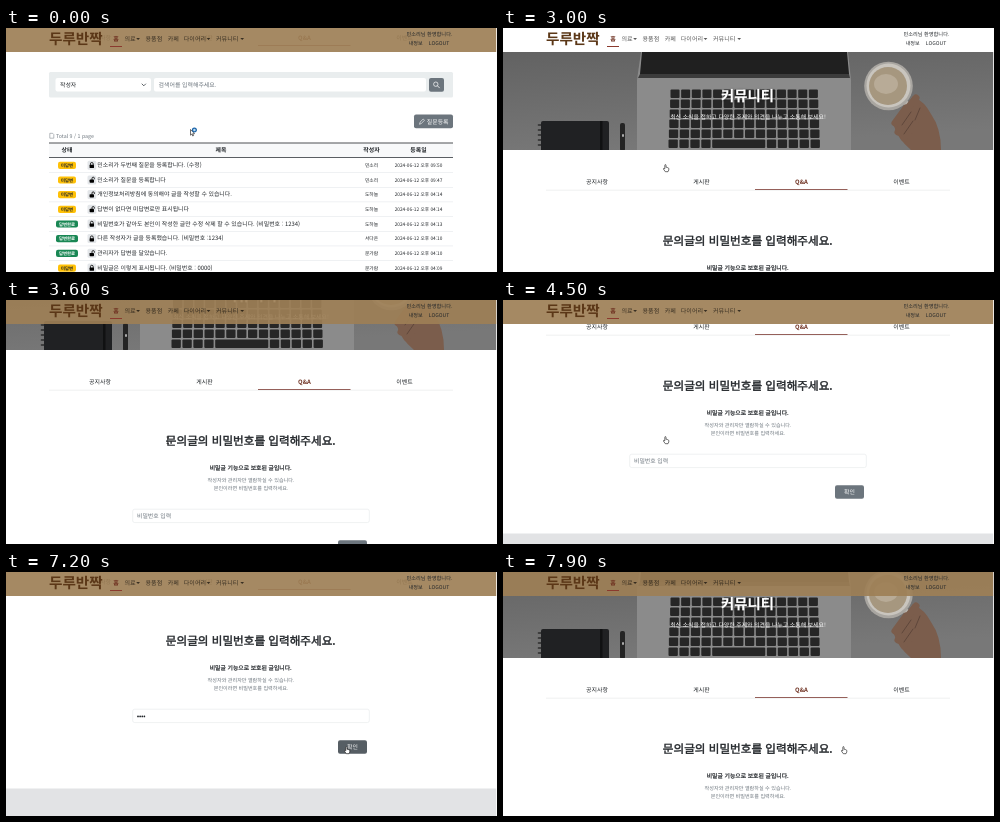
Write an HTML page that moves like this. It is 491 by 244 pixels and loops after 8 s.

```html
<!DOCTYPE html>
<html lang="ko">
<head>
<meta charset="utf-8">
<title>Q&amp;A</title>
<style>
html, body { margin: 0; width: 100%; height: 100%; overflow: hidden; background: #fff; }
svg { display: block; width: 491px; height: 244px; }
text { font-family: "Noto Sans CJK KR", "Noto Sans KR", "Noto Sans CJK", sans-serif; text-rendering: geometricPrecision; white-space: pre; }
/* medium weight: regular with a hairline outline */
text[font-weight="500"] { stroke: #212529; stroke-width: .035em; }

/* One shared 8 s clock; 1% = 80 ms. */
.a { animation: 8s linear infinite; }
.step { animation-timing-function: step-end; }
#list { animation-name: list; }
#page { animation-name: page; }
#scroll { animation-name: scroll; }
#bar { animation-name: bar; }
#hover { animation-name: hover; }
#cursor { animation-name: move; animation-timing-function: ease-in-out; }
#hand { animation-name: hand; }
#arrow { animation-name: arrow; }
#busy { animation-name: busy; }
#beam { animation-name: beam; }
#ring { animation-name: ring; }
#hint { animation-name: hint; }
#cover { animation-name: typing; }
#ok { animation-name: ok; }

@keyframes list { 0% { opacity: 1 } 25%, 100% { opacity: 0 } }
@keyframes page { 0% { opacity: 0 } 25%, 100% { opacity: 1 } }
@keyframes scroll {
  0%, 38.75% { transform: translateY(0) }
  45%, 46.25% { transform: translateY(-72px) }
  50%, 59% { transform: translateY(-127px) }
  63%, 93.74% { transform: translateY(-144px) }
  93.75%, 96.25% { transform: translateY(0) }
  98.75%, 100% { transform: translateY(-36px) }
}
@keyframes bar {
  0%, 39%, 96.3% { fill: rgba(158,127,86,.92) }
  25%, 93.75% { fill: #fff }
  100% { fill: rgba(158,127,86,.92) }
}
@keyframes hover { 0% { opacity: 0 } 12.5%, 100% { opacity: 1 } }
@keyframes move {
  0%, 6.25% { transform: translate(186px,104px) }
  15%, 19% { transform: translate(165px,137px) }
  22.5%, 58.75% { transform: translate(163px,140px) }
  65%, 80% { transform: translate(200px,145px) }
  87.5%, 100% { transform: translate(341px,178px) }
}
@keyframes hand {
  0%, 43.75%, 63.75% { opacity: 0 }
  12.5%, 47.5%, 86.25%, 100% { opacity: 1 }
}
@keyframes arrow { 0%, 81.25% { opacity: 1 } 12.5%, 86.25%, 100% { opacity: 0 } }
@keyframes busy { 0% { opacity: 1 } 8.75%, 100% { opacity: 0 } }
@keyframes beam {
  0%, 47.5%, 81.25%, 100% { opacity: 0 }
  43.75%, 63.75% { opacity: 1 }
}
@keyframes ring { 0%, 88.75%, 100% { opacity: 0 } 66.25% { opacity: 1 } }
@keyframes hint { 0%, 93.75%, 100% { opacity: 1 } 70% { opacity: 0 } }
@keyframes typing {
  0%, 93.75%, 100% { transform: translateX(0) }
  70% { transform: translateX(2.2px) }
  72.5% { transform: translateX(4.4px) }
  75% { transform: translateX(6.6px) }
  77.5% { transform: translateX(9px) }
}
@keyframes ok {
  0%, 86%, 93.75%, 100% { fill: #6c757d }
  88%, 93.74% { fill: #565e64 }
}
</style>
</head>
<body>
<svg id="stage" viewBox="0 0 491 244"></svg>
<script>
const INK = '#212529', GREY = '#6c757d', BROWN = '#6d2f1f', WIDE = 490.2;

// y is the middle of the line of text
const text = (x, y, size, str, fill = INK, weight = 400, anchor = 'start') =>
  `<text x="${x}" y="${(y + size * 0.37).toFixed(2)}" font-size="${size}" fill="${fill}" font-weight="${weight}" text-anchor="${anchor}">${str}</text>`;
const mid = (x, y, size, str, fill, weight) => text(x, y, size, str, fill, weight, 'middle');
const rect = (x, y, w, h, fill, r = 0, more = '') =>
  `<rect x="${x}" y="${y}" width="${w}" height="${h}" fill="${fill}" rx="${r}" ${more}/>`;
const path = (d, fill, more = '') => `<path d="${d}" fill="${fill}" ${more}/>`;
const line = (d, color, width, more = '') =>
  path(d, 'none', `stroke="${color}" stroke-width="${width}" stroke-linecap="round" stroke-linejoin="round" ${more}`);

function tabs() {
  const names = ['공지사항', '게시판', 'Q&amp;A', '이벤트'], xs = [94, 198.5, 298.5, 398.5];
  return rect(43, 161.8, 404, .6, '#e3e5e7') + rect(252, 161, 92.5, 1, '#95605a') +
    names.map((n, i) => mid(xs[i], 154, 5.95, n, i === 2 ? BROWN : INK, i === 2 ? 700 : 400)).join('');
}

function keyboard() {
  let keys = '';
  for (let r = 0; r < 6; r++) {
    const y = 61.5 + r * 10, left = 167.5 - r * .4, pitch = (149 + r * .8) / 14;
    for (let k = 0; k < 14; k++) {
      const space = r === 5 && k === 4;
      keys += rect(left + k * pitch, y, (space ? 5 : 1) * pitch - 1.6, 8.4, '#262626', 1);
      if (space) k += 4;
    }
  }
  return keys;
}

function mug() {
  const skin = '#7b5d4c', crease = '#5c4539';
  return line('M402 74L408 80', '#b9b5af', 5) +
    `<circle cx="385.5" cy="58" r="24.3" fill="#a9a6a1"/><circle cx="385.5" cy="57.5" r="22" fill="#c9c5be"/>
     <circle cx="385" cy="58" r="19" fill="#a6977f"/><ellipse cx="383" cy="56" rx="12" ry="10" fill="#b8ab97"/>` +
    path('M410 68Q422 74 428 86Q438 100 438 122H408Q394 110 391 98Z', skin) +
    line('M413 70L400 86M403 80L392 95M404 88L395 104M412 96L401 110', skin, 7) +
    line('M408 84L399 97M410 93L401 106M417 80L412 92', crease, .9);
}

function notebook() {
  let rings = '';
  for (let y = 97; y < 122; y += 5) rings += line(`M35.5 ${y}H40`, '#2c2c2c', 1.6);
  return rings + rect(38, 93, 68, 32, '#202123', 2) + rect(97, 93, 2.5, 29, '#101112') +
    rect(117, 95, 5, 28, '#242424', 2) + rect(119, 106, 2, 3, '#aaa', 1);
}

function banner() {
  return `<g clip-path="url(#bannerBox)">` +
    rect(0, 24, WIDE, 98, 'url(#desk)') +
    path('M138 24H345L348 52V122H134V52Z', '#8b8b8b') +
    path('M139 24H344L346 46H137Z', '#202020') +
    path('M137 46H346L347 50H135Z', '#3c3c3c') +
    keyboard() + notebook() + mug() + '</g>' +
    `<g filter="url(#soft)">${mid(244.5, 68, 14.4, '커뮤니티', '#fff', 700)}</g>` +
    mid(245, 89, 5.88, '최신 소식을 접하고 다양한 주제와 의견을 나누고 소통해 보세요!', '#fff');
}

function lock(y, open) {
  const shackle = open ? 'M86 0V-1.5A1.2 1.2 0 0 1 88.4 -1.5V-1' : 'M84.4 0V-1.3A1.4 1.4 0 0 1 87.2 -1.3V0';
  return `<g transform="translate(0 ${y})">` + rect(81.5, -4.5, 8.8, 9, '#e3e6e9', 1.5) +
    line(shackle, '#000', .8) + rect(83.6, -.4, 4.4, 3.3, '#000', .7) + '</g>';
}

// status (1 = answered), locked, title, author, time
const rows = [
  [0, 1, '민소리가 두번째 질문을 등록합니다. (수정)', '민소리', '09:50'],
  [0, 0, '민소리가 질문을 등록합니다', '민소리', '09:47'],
  [0, 0, '개인정보처리방침에 동의해야 글을 작성할 수 있습니다.', '도하늘', '04:14'],
  [0, 0, '답변이 없다면 미답변로만 표시됩니다', '도하늘', '04:14'],
  [1, 1, '비밀번호가 같아도 본인이 작성한 글만 수정 삭제 할 수 있습니다. (비밀번호 : 1234)', '도하늘', '04:13'],
  [1, 1, '다른 작성자가 글을 등록했습니다. (비밀번호 :1234)', '서다온', '04:10'],
  [1, 0, '관리자가 답변을 달았습니다.', '문가람', '04:10'],
  [0, 1, '비밀글은 이렇게 표시됩니다. (비밀번호 : 0000)', '문가람', '04:09'],
];

function row([done, locked, title, author, time], i) {
  const y = 137.2 + i * 14.68, w = done ? 22 : 18;
  return rect(61 - w / 2, y - 3.5, w, 7.2, done ? '#198754' : '#ffc107', 2) +
    mid(61, y, 4.4, done ? '답변완료' : '미답변', done ? '#fff' : INK, 700) +
    lock(y, !locked) + text(91.3, y - .4, 5.9, title) +
    mid(365.5, y, 4.8, author) + mid(412.5, y, 4.75, '2024-06-12 오후 ' + time) +
    rect(43, y + 7.1, 404, .5, '#dee2e6');
}

function list() {
  const head = [[61, '상태'], [215, '제목'], [365.5, '작성자'], [412.5, '등록일']];
  return rect(0, 0, 491, 244, '#fff') + `<g transform="translate(0 -144)">${tabs()}</g>` +
    rect(43, 44, 404, 25.5, '#e9edee', 1.5) +
    rect(49.5, 50, 95.5, 13.5, '#fff', 2) + text(54, 57, 5.9, '작성자') +
    line('M136 56L137.8 57.8L139.6 56', '#343a40', .8) +
    rect(148, 50, 272, 13.5, '#fff', 2) + text(152.5, 57, 5.95, '검색어를 입력해주세요.', GREY) +
    rect(423, 50, 15, 13.8, GREY, 2) +
    `<circle cx="429.8" cy="56.2" r="2.2" fill="none" stroke="#fff" stroke-width=".7"/>` + line('M431.5 57.9L433.4 59.8', '#fff', .8) +
    rect(408, 86.5, 39, 13.7, GREY, 2) + text(420.8, 93.4, 5.9, '질문등록', '#fff') +
    line('M413.6 95.9L414.2 94L417.2 91L418.5 92.3L415.5 95.3Z', '#fff', .6) +
    line('M44.2 105.3H46.7L47.8 106.5V110.2H44.2Z', GREY, .5) + text(50, 107.7, 5.25, 'Total 9 / 1 page', GREY) +
    rect(43, 115, 404, 14, '#f8f9fa') + rect(43, 114.6, 404, .8, INK) +
    head.map(([x, s]) => mid(x, 122, 5.9, s, INK, 700)).join('') +
    `<g id="hover" class="a step">${rect(43, 129.6, 404, 14.7, '#ececec')}</g>` +
    rect(43, 129, 404, .8, '#33383c') + rows.map(row).join('');
}

function form() {
  let dots = '';
  for (let i = 0; i < 4; i++) dots += `<circle cx="${132 + i * 2.15}" cy="288.4" r=".9" fill="${INK}"/>`;
  return rect(0, 24, 491, 620, '#fff') + banner() + tabs() +
    mid(244.7, 213, 11.6, '문의글의 비밀번호를 입력해주세요.', INK, 500) +
    mid(244.7, 240, 5.86, '비밀글 기능으로 보호된 글입니다.', INK, 500) +
    mid(245, 252, 5.1, '작성자와 관리자만 열람하실 수 있습니다.', GREY) +
    mid(245, 260, 5.1, '본인이라면 비밀번호를 입력하세요.', GREY) +
    rect(126.7, 281.2, 236.6, 13.4, '#fff', 2, 'stroke="#e4e7ea" stroke-width=".6"') + dots +
    rect(130.5, 284, 30, 8, '#fff', 0, 'id="cover" class="a step"') +
    `<g id="hint" class="a step">${text(131, 288, 5.9, '비밀번호 입력', GREY)}</g>` +
    `<g id="ring" class="a step">${rect(125.7, 280.2, 238.6, 15.4, 'none', 3, 'stroke="#0d6efd" stroke-opacity=".25" stroke-width="2"')}
     ${rect(126.7, 281.2, 236.6, 13.4, 'none', 2, 'stroke="#86b7fe" stroke-width=".6"')}</g>` +
    rect(332, 312.2, 29, 13.6, GREY, 2, 'id="ok" class="a"') + mid(346.4, 319, 5.9, '확인', '#fff') +
    rect(0, 360.5, WIDE, 280, '#e2e3e5');
}

function header() {
  const ink = 'rgba(0,0,0,.65)';
  const items = [[118.5, '의료', 130.2], [139.5, '용품점'], [161.8, '카페'], [177.8, '다이어리', 200.6], [210, '커뮤니티', 234.3]];
  return rect(0, 0, WIDE, 24, '#fff', 0, 'id="bar" class="a step"') +
    text(43, 11, 14.6, '두루반짝', '#5b3717', 700) +
    text(107.2, 11, 6, '홈', BROWN, 700) + rect(104, 18, 12, 1, '#8b3a2e') +
    items.map(([x, s, caret]) => text(x, 11, 6.05, s, ink) +
      (caret ? path(`M${caret} 10H${caret + 3.8}L${caret + 1.9} 12Z`, ink) : '')).join('') +
    text(400.5, 6, 5.2, '민소리님 환영합니다.') + text(402.7, 15, 5.1, '내정보') + text(422.8, 15, 5.1, 'LOGOUT');
}

function cursor() {
  const edge = 'stroke="#111" stroke-width=".6" stroke-linejoin="round"';
  return `<g id="cursor" class="a">
    <g id="arrow" class="a step">${path('M-1.5 -2.5V3.2L-.2 2L.7 4L1.6 3.6L.7 1.7H2.5Z', '#fff', edge)}</g>
    <g id="busy" class="a step"><circle cx="2.4" cy="-2" r="1.9" fill="#b9dcf5" stroke="#1c64a8" stroke-width="1.3"/></g>
    <g id="hand" class="a step">${path('M-1.2 .8V-2.6Q-1.2 -3.4 -.6 -3.4T0 -2.6V-.6Q.6 -1 1.1 -.4Q1.8 -.7 2.1 0Q2.8 -.1 2.8 .8V2L2 3.7H-.7L-2.6 1Q-2.6 .2 -1.8 .3Z', '#fff', edge)}</g>
    <g id="beam" class="a step">${line('M-2.2 -3H-.4M-1.3 -3V3.4M-2.2 3.4H-.4', '#222', .6)}</g>
  </g>`;
}

document.getElementById('stage').innerHTML = `<defs>
  <linearGradient id="desk" x2=".3" y2="1"><stop offset="0" stop-color="#626262"/><stop offset="1" stop-color="#787878"/></linearGradient>
  <clipPath id="bannerBox"><rect x="0" y="24" width="491" height="98"/></clipPath>
  <filter id="soft"><feDropShadow dx=".5" dy=".5" stdDeviation=".8" flood-opacity=".6"/></filter>
</defs>
<g id="page" class="a step"><g id="scroll" class="a">${form()}</g></g>
<g id="list" class="a step">${list()}</g>
${header()}${cursor()}`;
</script>
</body>
</html>
```
